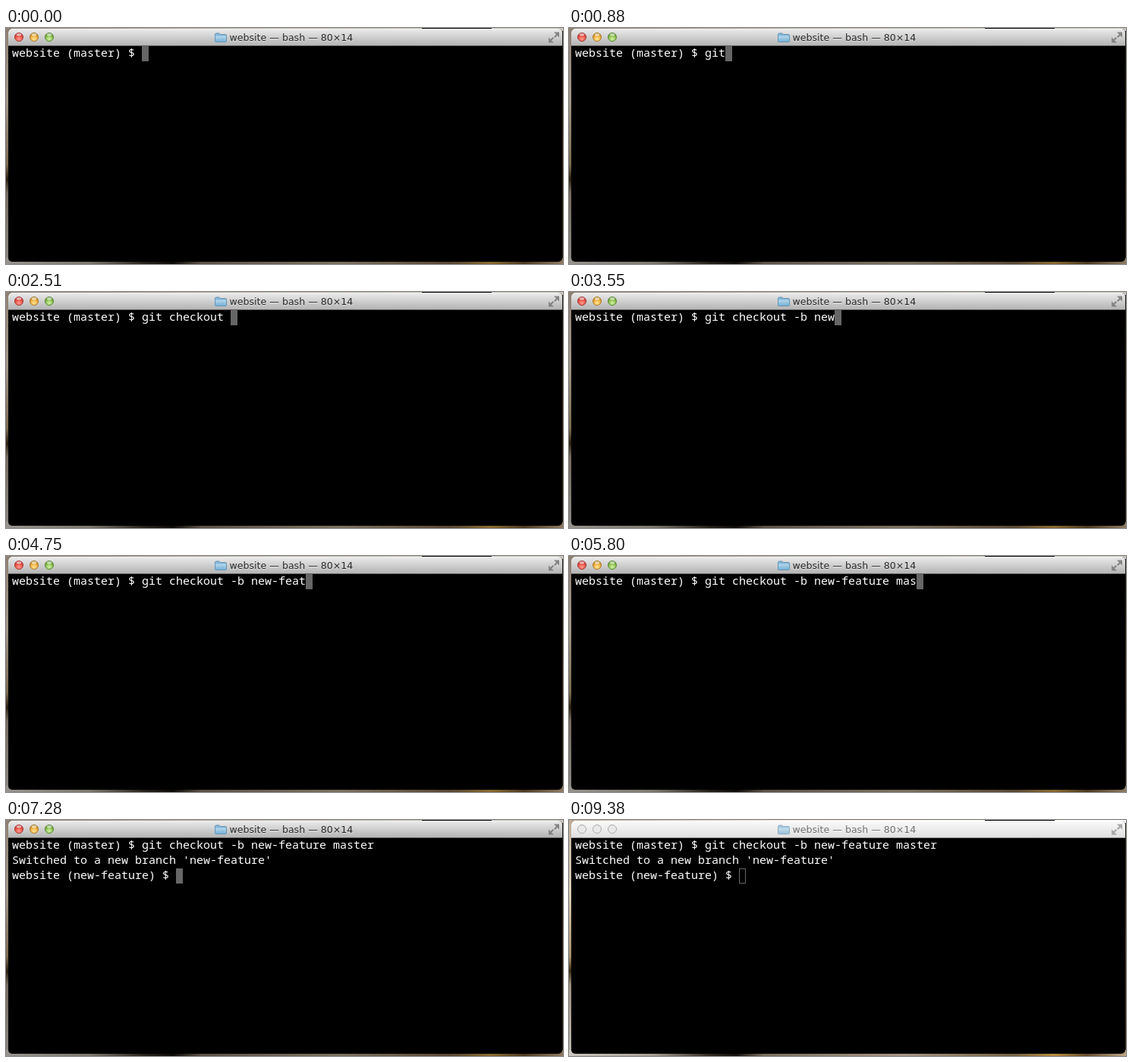
Recreate the animation shown at these times as an HTML page. Size 734 by 312 pixels, loop 9.48 s.

```html
<!DOCTYPE html>
<html lang="en">
<head>
<meta charset="utf-8">
<title>Terminal</title>
<style>
  html, body { margin: 0; width: 100%; height: 100%; overflow: hidden; background: #000; }
  svg { display: block; width: 734px; height: 312px; }
  .term { font: 300 15px "Noto Sans Mono", "DejaVu Sans Mono", monospace; fill: #fff; white-space: pre; }
  .title { font: 12.6px "DejaVu Sans", "Open Sans", sans-serif; }
</style>
</head>
<body>
<svg viewBox="0 0 734 312" xmlns="http://www.w3.org/2000/svg">
  <defs>
    <linearGradient id="bar" x2="0" y2="1">
      <stop offset="0" stop-color="#ebebeb"/><stop offset="1" stop-color="#b2b2b2"/>
    </linearGradient>
    <linearGradient id="barIdle" x2="0" y2="1">
      <stop offset="0" stop-color="#fafafa"/><stop offset="1" stop-color="#dedede"/>
    </linearGradient>
    <linearGradient id="sky">
      <stop offset="0" stop-color="#8b7d6d"/><stop offset=".4" stop-color="#b9b0a3"/>
      <stop offset="1" stop-color="#cbc5bb"/>
    </linearGradient>
    <linearGradient id="side" x2="0" y2="1">
      <stop offset="0" stop-color="#8d7f70"/><stop offset=".3" stop-color="#a39788"/>
      <stop offset=".58" stop-color="#7a6a50"/><stop offset=".64" stop-color="#2c2110"/>
      <stop offset=".7" stop-color="#756b5e"/><stop offset="1" stop-color="#8a8782"/>
    </linearGradient>
    <linearGradient id="edge" x2="0" y2="1">
      <stop offset="0" stop-color="#1a150e"/><stop offset=".5" stop-color="#3a2a14"/>
      <stop offset="1" stop-color="#2a2014"/>
    </linearGradient>
    <linearGradient id="floor">
      <stop offset="0" stop-color="#96938e"/><stop offset=".15" stop-color="#7b766e"/>
      <stop offset=".25" stop-color="#25201a"/><stop offset=".3" stop-color="#0c0a08"/>
      <stop offset=".35" stop-color="#5a5146"/><stop offset=".6" stop-color="#7b6f60"/>
      <stop offset=".8" stop-color="#564630"/><stop offset=".87" stop-color="#8a682e"/>
      <stop offset=".93" stop-color="#4b3820"/><stop offset="1" stop-color="#8d7b62"/>
    </linearGradient>
    <linearGradient id="folder" x2="0" y2="1">
      <stop offset="0" stop-color="#b5d9ee"/><stop offset="1" stop-color="#79b1d6"/>
    </linearGradient>
    <radialGradient id="red" cy=".75" r=".75">
      <stop offset="0" stop-color="#ff9d90"/><stop offset=".55" stop-color="#e9554b"/><stop offset="1" stop-color="#a5302a"/>
    </radialGradient>
    <radialGradient id="amber" cy=".75" r=".75">
      <stop offset="0" stop-color="#ffe596"/><stop offset=".55" stop-color="#efb344"/><stop offset="1" stop-color="#a87220"/>
    </radialGradient>
    <radialGradient id="green" cy=".75" r=".75">
      <stop offset="0" stop-color="#d5f3a0"/><stop offset=".55" stop-color="#8fc356"/><stop offset="1" stop-color="#4f8428"/>
    </radialGradient>
  </defs>

  <g id="desk">
    <rect width="734" height="312" fill="url(#sky)"/>
    <rect x="548" width="92" height="2" fill="#0c0a08"/>
    <rect width="4" height="312" fill="url(#side)"/>
    <rect x="732" y="4" width="2" height="308" fill="url(#edge)"/>
    <rect y="304" width="734" height="8" fill="url(#floor)"/>
  </g>

  <rect x="3" y="1" width="730" height="308" rx="5"/>
  <path id="head" d="M3 24V6a5 5 0 0 1 5-5H728a5 5 0 0 1 5 5V24Z"/>
  <path d="M7 1.5H729" stroke="#fff" stroke-opacity=".6"/>
  <path id="seam" d="M3 23.5H733"/>

  <g id="lights"></g>
  <g id="gloss" fill="#fff">
    <ellipse cx="17" cy="8.800" rx="3.200" ry="1.700"/>
    <ellipse cx="37" cy="8.800" rx="3.200" ry="1.700"/>
    <ellipse cx="57" cy="8.800" rx="3.200" ry="1.700"/>
  </g>

  <g id="heading">
    <g id="icon">
      <path d="M275.5 17.5V8.5q0-1.500 1.500-1.500h4l1.500 1.500h6.500q1.500 0 1.500 1.500v7.500q0 1-1 1h-13q-1 0-1-1Z" fill="#85b7d8" stroke="#6794b5"/>
      <path d="M276 10.500h14v7.500h-14Z" fill="url(#folder)"/>
    </g>
    <text id="shine" class="title" x="294.500" y="18" fill="#fff" opacity=".5"></text>
    <text id="title" class="title" x="294.500" y="17"></text>
  </g>

  <g id="expand">
    <path d="M722 5.500h7v7l-2.500-2.500-3 3-1.500-1.500 3-3Z"/>
    <path d="M722 19.500h-7v-7l2.500 2.500 3-3 1.500 1.500-3 3Z"/>
  </g>

  <g class="term">
    <text id="row0" x="8" y="38"></text>
    <text id="row1" x="8" y="58"></text>
    <text id="row2" x="8" y="78"></text>
  </g>
  <rect id="cursor"/>
</svg>

<script>
const LOOP = 9480, IDLE_AT = 9380;
const CELL = 9, ROW = 20, LEFT = 8, TOP = 24;
const PROMPT = "website (master) $ ";
const COMMAND = "git checkout -b new-feature master";
const REPLY = "Switched to a new branch 'new-feature'";
const NEXT_PROMPT = "website (new-feature) $ ";
const ENTER = 6840, RUN = 6987, PRINT = 7133, DONE = 7280;

// Typing bursts: first and last moment, then the length reached at each step.
const BURSTS = [
  [450, 1470, 1, 2, 3, 4, 5, 6, 7, 8],
  [1620, 2060, 9, 10, 11, 12],
  [2510, 2810, 13, 14],
  [3110, 3550, 15, 16, 18, 19],
  [4150, 4750, 20, 22, 24],
  [5050, 5200, 25, 27],
  [5500, 5800, 28, 30, 31],
  [6100, 6250, 32, 34]
];

const $ = id => document.getElementById(id);

function set(id, attrs) {
  for (const key in attrs) $(id).setAttribute(key, attrs[key]);
}

const rims = { red: "#a63a33", amber: "#a87a2c", green: "#5b8a35" };
const lights = Object.keys(rims).map((name, i) => {
  const dot = document.createElementNS("http://www.w3.org/2000/svg", "circle");
  dot.setAttribute("cx", 17 + 20 * i);
  dot.setAttribute("cy", 12);
  dot.setAttribute("r", 5.5);
  $("lights").append(dot);
  return { dot, name };
});

function typedLength(t) {
  let length = 0;
  for (const [from, to, ...counts] of BURSTS) {
    const gap = (to - from) / (counts.length - 1);
    counts.forEach((count, i) => {
      if (t >= Math.round(from + gap * i)) length = count;
    });
  }
  return length;
}

function drawChrome(idle, job) {
  $("desk").style.filter = idle ? "brightness(1.35)" : "none";
  set("head", { fill: idle ? "url(#barIdle)" : "url(#bar)" });
  set("seam", { stroke: idle ? "#8c8c8c" : "#5c5c5c" });
  set("icon", { opacity: idle ? 0.7 : 1 });
  set("gloss", { opacity: idle ? 0 : 0.6 });
  set("title", { fill: idle ? "#707070" : "#262626" });
  set("expand", { fill: idle ? "#a8a8a8" : "#858585" });
  for (const { dot, name } of lights) {
    dot.setAttribute("fill", idle ? "#e9e9e9" : `url(#${name})`);
    dot.setAttribute("stroke", idle ? "#ababab" : rims[name]);
  }
  $("title").textContent = $("shine").textContent = `website — ${job} — 80×14`;
  set("heading", { transform: `translate(${job === "git" ? 7 : 0} 0)` });
}

function drawCursor(col, row, idle) {
  const inset = idle ? 0.5 : 0;
  set("cursor", {
    x: LEFT + col * CELL + inset,
    y: TOP + row * ROW + inset,
    width: CELL - 2 * inset,
    height: ROW - 2 * inset,
    fill: idle ? "none" : "#666",
    stroke: idle ? "#666" : "none"
  });
}

function draw(t) {
  const idle = t >= IDLE_AT;
  const length = typedLength(t);
  drawChrome(idle, t >= RUN && t < DONE ? "git" : "bash");
  $("row0").textContent = PROMPT + COMMAND.slice(0, length);
  $("row1").textContent = t >= PRINT ? REPLY : "";
  $("row2").textContent = t >= DONE ? NEXT_PROMPT : "";

  if (t >= DONE) drawCursor(NEXT_PROMPT.length, 2, idle);
  else if (t >= PRINT) drawCursor(0, 2, idle);
  else if (t >= ENTER) drawCursor(0, 1, idle);
  else drawCursor(PROMPT.length + length, 0, idle);
}

const start = performance.now();
function tick() {
  draw((performance.now() - start) % LOOP);
  requestAnimationFrame(tick);
}
tick();
</script>
</body>
</html>
```
